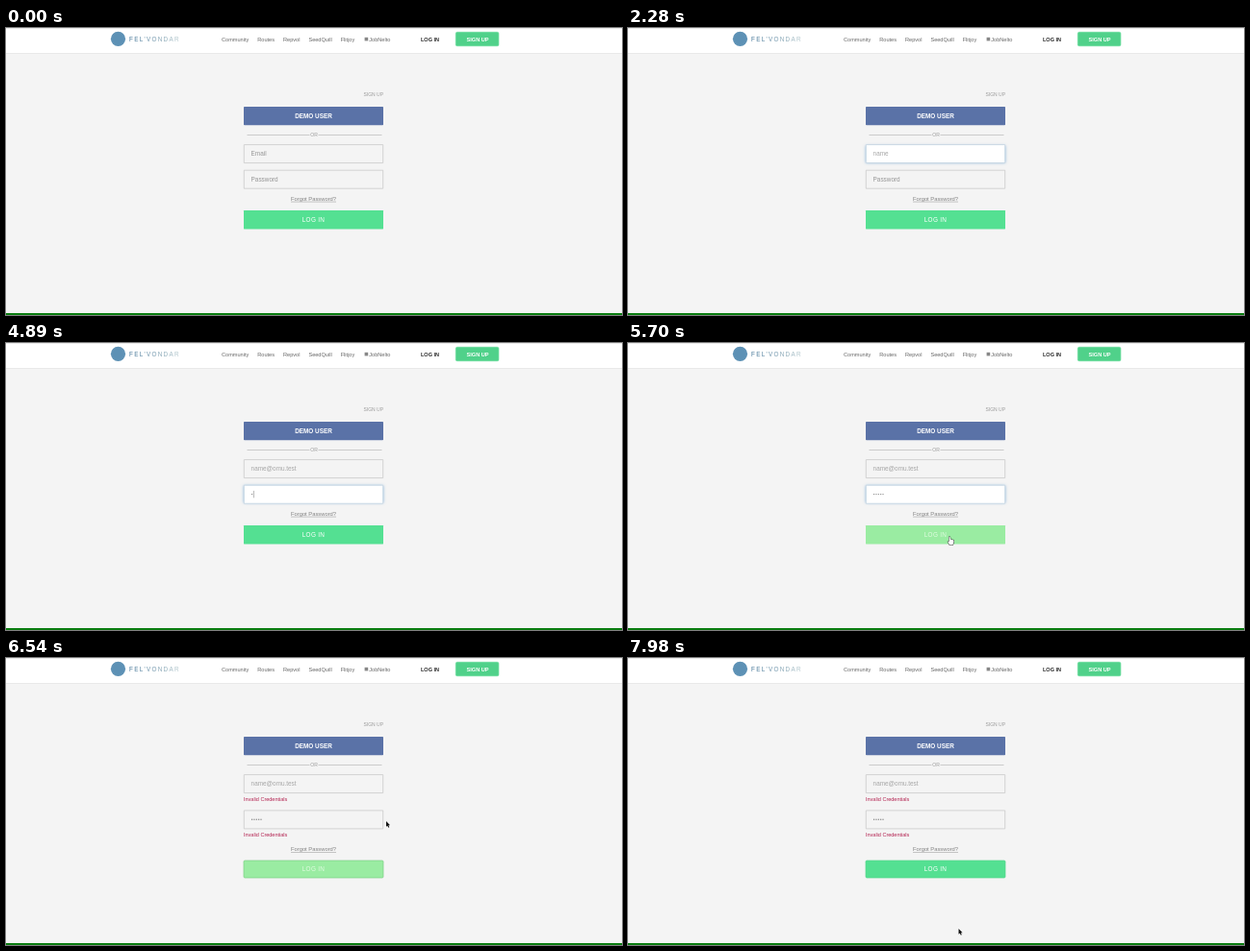
Animation of 640 by 299 pixels, one loop 8000 ms. Source, as an HTML page with a canvas:

```html
<!DOCTYPE html>
<html lang="en">
<head>
<meta charset="utf-8">
<title>Log in form</title>
<style>
html, body { margin: 0; width: 100%; height: 100%; overflow: hidden; background: #f4f4f4; }
canvas { display: block; width: 640px; height: 299px; }
</style>
</head>
<body>
<canvas id="stage"></canvas>
<script>
const LOOP = 8000;
const canvas = document.getElementById('stage');
const ctx = canvas.getContext('2d');
const ratio = window.devicePixelRatio || 1;
canvas.width = 640 * ratio;
canvas.height = 299 * ratio;

const LEFT = 247, WIDTH = 145, CENTER = LEFT + WIDTH / 2;
const EMAIL_Y = 121.3;
const FOCUS_EMAIL = 1050, FOCUS_PASSWORD = 4200, SUBMIT = 5940, ERROR = 6360;

// Each burst types `count` keys at an even pace
const burst = (count, start, pace = 0) => Array.from({ length: count }, (_, i) => start + i * pace);
const EMAIL = 'name@omu.test';
const emailKeys = [...burst(4, 1440, 130), ...burst(1, 2520), ...burst(4, 2910, 80), ...burst(4, 3750, 110)];
const passwordKeys = burst(5, 4890, 60);
const caretEvents = [FOCUS_EMAIL, ...emailKeys, FOCUS_PASSWORD, ...passwordKeys];

const origin = { x: 328, y: 296 };
const moves = [
  { start: 60, end: 360, x: 332, y: 251 },
  { start: 750, end: 1080, x: 332, y: 139 },
  { start: 5370, end: 5700, x: 335, y: 206 },
  { start: 6360, end: 6540, x: 395, y: 170 },
  { start: 7020, end: 7230, x: 362, y: 140 },
  { start: 7230, end: 7860, x: 361, y: 278 },
  { start: 7860, end: 7980, x: 343.5, y: 282 }
];

const ramp = (t, from, to) => Math.max(0, Math.min(1, (t - from) / (to - from)));
const ease = k => (1 - Math.cos(Math.PI * k)) / 2;
const mix = (a, b, k) => `rgb(${a.map((v, i) => Math.round(v + (b[i] - v) * k))})`;
const typed = (t, keys) => keys.filter(k => k <= t).length;
const buttonTop = t => t < ERROR ? 190 : 211;
const buttonHeight = t => t < ERROR ? 19.5 : 18;

function pointerAt(t) {
  let { x, y } = origin;
  for (const move of moves) {
    const k = ease(ramp(t, move.start, move.end));
    x += (move.x - x) * k;
    y += (move.y - y) * k;
  }
  return { x, y };
}

const isOver = ({ x, y }, top, height) => x > LEFT && x < LEFT + WIDTH && y > top && y < top + height;

// Hover fades over 100 ms; the button stays light while the form is being sent
function buttonLight(t) {
  if (t >= SUBMIT && t < 6750) return 1 - ramp(t, 6560, 6750);
  const hits = burst(10, t - 90, 10).filter(s => isOver(pointerAt(s), buttonTop(s), buttonHeight(s)));
  return hits.length / 10;
}

function rect(x, y, w, h, color) {
  ctx.fillStyle = color;
  ctx.fillRect(x, y, w, h);
}

function box(x, y, w, h, radius, fill, stroke) {
  ctx.beginPath();
  ctx.roundRect(x, y, w, h, radius);
  ctx.fillStyle = fill;
  ctx.fill();
  if (!stroke) return;
  ctx.strokeStyle = stroke;
  ctx.lineWidth = 0.7;
  ctx.stroke();
}

function dot(x, y, radius, color) {
  ctx.fillStyle = color;
  ctx.beginPath();
  ctx.arc(x, y, radius, 0, 7);
  ctx.fill();
}

function text(str, x, y, size, color, { align = 'left', weight = 400, spacing = 0 } = {}) {
  ctx.font = `${weight} ${size}px "Liberation Sans", Arial, sans-serif`;
  ctx.letterSpacing = spacing + 'px';
  ctx.textAlign = align;
  ctx.fillStyle = color;
  ctx.fillText(str, x, y);
  return ctx.measureText(str).width;
}

function header() {
  rect(0, 0, 640, 26, '#fff');
  rect(0, 0, 640, 0.6, '#dedede');
  rect(0, 26, 640, 0.7, '#e6e6e6');
  dot(116.5, 11.3, 7.6, '#5d91b5');
  const tint = ctx.createLinearGradient(128, 0, 181, 0);
  tint.addColorStop(0, '#3f7396');
  tint.addColorStop(0.6, '#86a5b6');
  tint.addColorStop(1, '#bccfd2');
  text("FEL'VONDAR", 128, 13.9, 6.4, tint, { spacing: 1.25 });

  let x = 224;
  for (const label of ['Community', 'Routes', 'Repvol', 'SeedQuill', 'Flitjoy']) {
    x += text(label, x, 13.8, 5.6, '#666') + 9;
  }
  rect(372.6, 9.8, 3.6, 3.6, '#888');
  text('JobNelto', 377.3, 13.8, 5.6, '#666');
  text('LOG IN', 431, 13.8, 5.5, '#222', { weight: 700 });
  box(467.3, 4.3, 44.6, 14.4, 1.5, '#50d18a', '#68dd9b');
  text('SIGN UP', 490, 13.8, 5.6, '#fff', { weight: 700, align: 'center' });
}

function field(y, focused, caret, drawContent) {
  ctx.save();
  if (focused) {
    ctx.shadowColor = '#8fb9dd';
    ctx.shadowBlur = 3 * ratio;
  }
  box(LEFT + 0.3, y + 0.3, WIDTH - 0.6, 19, 0, focused ? '#fff' : '#f4f4f4');
  ctx.restore();
  ctx.strokeStyle = focused ? '#bccfdd' : '#c4c4c4';
  ctx.lineWidth = 0.7;
  ctx.stroke();
  const end = drawContent(254.6, y);
  if (caret) rect(end, y + 6, 0.6, 7.4, '#888');
}

function textContent(value, placeholder) {
  return (x, y) => {
    const width = text(value || placeholder, x, y + 12, 6.4, value ? '#a6a6a6' : '#969696');
    return value ? x + width : x;
  };
}

function dotContent(count) {
  return (x, y) => {
    for (let i = 0; i < count; i++) dot(x + 1 + i * 2.35, y + 9.7, 0.7, '#858585');
    return x + count * 2.35;
  };
}

function shape(path, fill, stroke, width) {
  const outline = new Path2D(path);
  ctx.lineJoin = 'round';
  ctx.lineWidth = width;
  ctx.strokeStyle = stroke;
  ctx.stroke(outline);
  ctx.fillStyle = fill;
  ctx.fill(outline);
}

function drawPointer(t) {
  const pointer = pointerAt(t);
  ctx.save();
  ctx.translate(pointer.x, pointer.y);
  if (isOver(pointer, buttonTop(t), buttonHeight(t))) {
    shape('M-1.5-4h1.1l.4 2.6 3.4 1v2l-1 2.6h-3.3l-1.8-3.2 1.4-.2z', '#fff', '#444', 1.1);
  } else if (isOver(pointer, EMAIL_Y, 19.5)) {
    rect(-0.3, -3.2, 0.7, 6.5, '#444');
    rect(-1.6, -3.4, 3.3, 0.6, '#666');
    rect(-1.6, 2.9, 3.3, 0.6, '#666');
  } else {
    shape('M0 0v5.8l1.3-1.1 1 2 1-.5-1-1.9h1.8z', '#111', '#fff', 0.7);
  }
  ctx.restore();
}

function draw(t) {
  const failed = t >= ERROR;
  const light = buttonLight(t);
  const caret = t - caretEvents.filter(e => e <= t).pop() < 450;
  const emailFocus = t >= FOCUS_EMAIL && t < FOCUS_PASSWORD;
  const passwordFocus = t >= FOCUS_PASSWORD && t < SUBMIT;
  const secretLength = typed(t, passwordKeys);
  const top = buttonTop(t), height = buttonHeight(t);

  ctx.setTransform(ratio, 0, 0, ratio, 0, 0);
  rect(0, 0, 640, 299, '#f4f4f4');
  header();

  text('SIGN UP', 392, 71.2, 5, '#999', { align: 'right' });
  box(LEFT, 82, WIDTH, 19.3, 0.8, '#5a72a7');
  text('DEMO USER', CENTER, 94, 6.4, '#fff', { align: 'center', weight: 700 });
  rect(250.5, 111, 140, 0.7, '#bbb');
  rect(315.5, 108, 9, 6, '#f4f4f4');
  text('OR', 320, 113.1, 5, '#999', { align: 'center' });

  field(EMAIL_Y, emailFocus, emailFocus && caret, textContent(EMAIL.slice(0, typed(t, emailKeys)), 'Email'));
  field(failed ? 158.6 : 147.9, passwordFocus, passwordFocus && caret,
    secretLength ? dotContent(secretLength) : textContent('', 'Password'));
  if (failed) {
    for (const y of [149, 186.4]) text('Invalid Credentials', LEFT, y, 5.5, '#b3204f');
  }
  const linkY = failed ? 201.4 : 180;
  text('Forgot Password?', CENTER, linkY, 5.8, '#808080', { align: 'center' });
  rect(296, linkY + 0.8, 47, 0.5, '#909090');

  box(LEFT, top, WIDTH, height, failed ? 1.2 : 0.4, mix([84, 224, 146], [154, 236, 162], light),
    failed && mix([84, 214, 140], [125, 206, 132], light));
  text('LOG IN', CENTER, top + height / 2 + 2.2, 6.4, mix([255, 255, 255], [225, 251, 225], light),
    { align: 'center', spacing: 0.3 });

  rect(0, 297, 640, 2, '#0a7d10');
  if (t >= 60 && t < emailKeys[0] || t >= 5370) drawPointer(t);
}

const start = performance.now();
function tick() {
  draw((performance.now() - start) % LOOP);
  requestAnimationFrame(tick);
}
tick();
</script>
</body>
</html>
```
